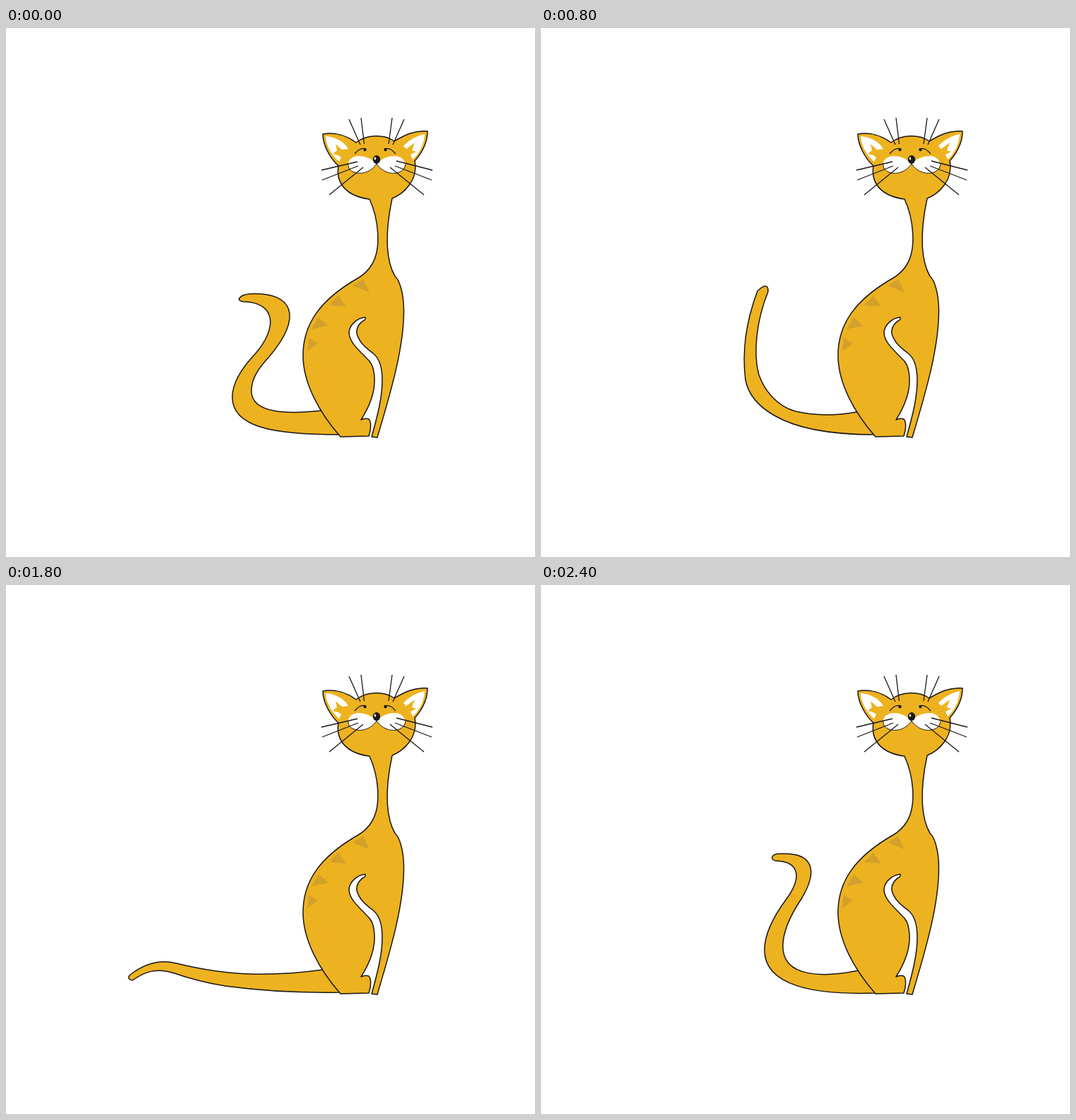
These frames come from a looping animation (748x748 px, 2.5 s). An HTML page with a canvas:

```html
<!DOCTYPE html>
<html lang="en">
<head>
<meta charset="utf-8">
<title>Cat</title>
<style>
html, body { margin: 0; width: 100%; height: 100%; overflow: hidden; background: #fff; }
canvas { display: block; }
</style>
</head>
<body>
<canvas id="stage" width="748" height="748"></canvas>
<script>
const ctx = document.getElementById('stage').getContext('2d');
const FUR = '#edb21f', STRIPE = '#d3a12b', INK = '#1a1718';
const LOOP = 2500, STEP = 100;

// Tail poses: inner edge from the base to the tip, then the outer edge back.
const curled = 'M446 541C400 546 347 546 347 513C347 495 358 480 372 465' +
  'C420 408 407 373 345 376C330 377 324 386 336 387C382 388 384 424 353 460' +
  'C334 480 320 502 320 522C320 564 377 575 471 575';
const upright = 'M446 541C400 546 347 546 347 513C347 495 358 480 372 465' +
  'C400 420 423 375 428 335C429 327 418 325 416 334C408 372 383 419 355 458' +
  'C334 482 320 502 320 522C320 564 377 575 471 575';
const leaning = 'M446 542C415 547 380 548 361 538C342 528 335 505 338 483' +
  'C340 455 352 390 366 343C367 331 356 332 351 341C335 388 322 440 321 487' +
  'C318 512 323 530 336 547C361 568 410 575 471 575';
const swinging = 'M446 543C418 548 386 548 360 542C334 535 316 513 308 490' +
  'C300 461 304 415 321 373C322 361 314 364 306 372C291 412 284 456 289 497' +
  'C293 519 309 536 330 548C363 567 410 575 471 575';
const lowered = 'M446 542C411 548 376 549 343 541C314 533 290 514 273 493' +
  'C257 476 242 454 231 432C226 422 219 424 216 434C229 461 242 488 262 509' +
  'C276 526 298 541 320 551C363 570 417 577 471 574';
const resting = 'M448 544C412 549 379 551 345 550C309 549 274 543 241 535' +
  'C218 529 197 535 177 550C171 554 173 558 179 559C197 546 214 541 238 549' +
  'C261 557 285 563 310 567C362 574 416 577 473 576';
const rising = 'M448 545C412 551 379 553 350 546C308 537 290 495 300 451' +
  'C307 420 306 384 273 400C262 402 262 411 273 411C293 403 293 426 287 452' +
  'C279 483 281 508 297 530C320 562 385 581 473 577';
const returning = 'M449 545C401 555 342 556 342 511C342 490 354 465 368 444' +
  'C393 403 384 378 340 380C324 379 324 389 332 390C366 391 369 414 347 444' +
  'C327 471 316 495 316 516C316 566 384 580 473 577';

const keys = [
  [0, curled], [400, upright], [600, leaning], [800, swinging],
  [1200, lowered], [1800, resting], [2200, rising], [2400, returning]
].map(([at, d]) => ({ at, pts: d.match(/\d+/g).map(Number) }));

const body = new Path2D('M514 242C526 268 532 311 517 335C512 343 506 349 497 354' +
  'C445 384 420 418 420 463C420 502 443 544 473 578L513 577' +
  'C517 566 516 556 513 553C510 552 506 552 502 554' +
  'C516 532 522 514 521 495C520 478 516 472 509 466C494 451 485 442 485 430' +
  'C486 420 496 410 508 409C509 411 508 412 507 413C499 417 495 425 496 432' +
  'C500 446 510 453 519 460C528 467 532 480 532 498C532 522 526 546 517 578L525 579' +
  'C545 512 563 450 562.5 398C562 373 556 356 550 351C539 332 534 297 546 241' +
  'C563 234 583 215 578 188C592 172 596 158 596 146C577 144 563 152 549 160' +
  'C535 150 510 150 495 162C482 152 465 147 448 150C448 165 458 184 470 195' +
  'C466 220 482 238 514 242Z');
const stripes = new Path2D('M505 355L490 364L514 374ZM470 378L457 392L481 394Z' +
  'M442 409L432 426L456 421ZM428 438L426 457L441 446Z');
const ears = new Path2D('M452 153C464 154 477 159 484 171L475 172L466 164L468 173' +
  'L462 178L470 180L474 183L471 189C461 180 453 168 452 153Z' +
  'M592 150C581 152 570 158 562 167L566 171L578 162L574 173L580 175L572 179' +
  'L575 186C585 177 591 165 592 150Z');
const muzzle = new Path2D('M524 192C517 184 506 181 498 181C482 182 480 197 490 203' +
  'C502 209 517 203 524 192C531 184 542 181 550 181C566 182 568 197 558 203' +
  'C546 209 531 203 524 192Z');
const mouth = new Path2D('M484 193C484 198 486 201 490 203C502 209 517 203 524 192' +
  'C531 203 546 209 558 203C562 201 564 198 565 193');
const lids = new Path2D('M493 178C498 172 503 169 508 171M551 178C546 172 541 169 536 171');
const whiskers = new Path2D('M485 129L501 165M502 127L506.5 164M546 127L541 164' +
  'M563 129L547 165M446 201L497 189M447 215L498 195M457 236L505 197' +
  'M603 201L552 188M602 215L550 195M591 236L543 197');

function fill(path, color) {
  ctx.fillStyle = color;
  ctx.fill(path);
}

function stroke(path, width) {
  ctx.strokeStyle = INK;
  ctx.lineWidth = width;
  ctx.stroke(path);
}

function oval(x, y, rx, ry, color) {
  const path = new Path2D();
  path.ellipse(x, y, rx, ry, 0, 0, Math.PI * 2);
  fill(path, color);
}

function tailAt(t) {
  const i = Math.max(1, keys.findIndex(k => k.at >= t));
  const a = keys[i - 1], b = keys[i];
  const u = (t - a.at) / (b.at - a.at);
  const p = a.pts.map((v, n) => v + (b.pts[n] - v) * u);
  const path = new Path2D();
  path.moveTo(p[0], p[1]);
  for (let n = 2; n < p.length; n += 6) path.bezierCurveTo(...p.slice(n, n + 6));
  // close underneath the body
  path.lineTo(495, 575);
  path.lineTo(495, 545);
  path.closePath();
  return path;
}

function draw(t) {
  ctx.fillStyle = '#fff';
  ctx.fillRect(0, 0, 748, 748);
  ctx.lineJoin = 'round';
  for (const part of [tailAt(t), body]) {
    fill(part, FUR);
    stroke(part, 1.5);
  }
  fill(stripes, STRIPE);
  fill(ears, '#fff');
  fill(muzzle, '#fff');
  stroke(mouth, 1);
  stroke(lids, 1.2);
  oval(507.5, 172, 2.2, 2.2, INK);
  oval(536.5, 172, 2.2, 2.2, INK);
  oval(524, 186, 5.2, 6, INK);
  oval(522, 184.5, 1.3, 1.9, '#fff');
  stroke(whiskers, 1.3);
}

const start = performance.now();
function tick() {
  const t = Math.max(0, performance.now() - start) % LOOP;
  draw(Math.floor(t / STEP) * STEP);
  requestAnimationFrame(tick);
}
tick();
</script>
</body>
</html>
```
